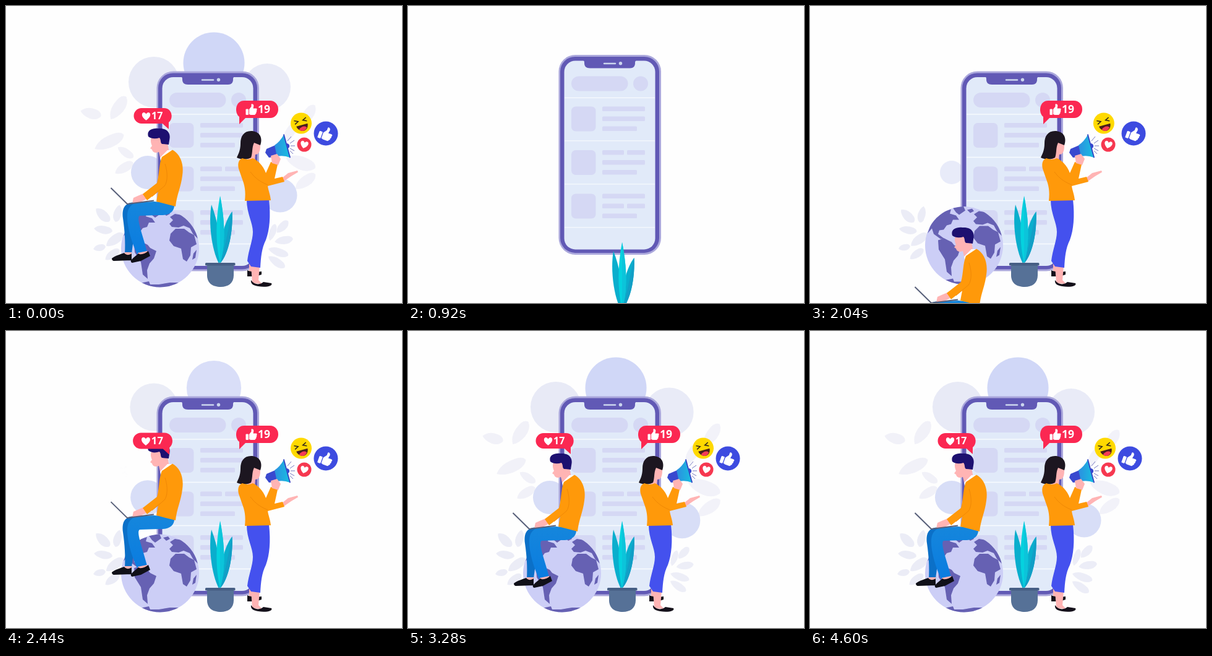
Recreate the animation shown at these times as an HTML page. Size 640x480 px, loop 4640 ms.

```html
<!DOCTYPE html>
<html lang="en">
<head>
<meta charset="utf-8">
<title>Social reactions</title>
<style>
html, body { margin: 0; width: 100%; height: 100%; overflow: hidden; background: #fefefe; }
svg { display: block; width: 100vw; height: 100vh; }
text { font-family: "Open Sans", "Noto Sans", sans-serif; font-weight: 700; fill: #fff; }
</style>
</head>
<body>
<svg viewBox="0 0 640 480" preserveAspectRatio="none">
  <defs>
    <linearGradient id="denim" x1="0" y1="0" x2="0" y2="1">
      <stop offset="0" stop-color="#1586dc"/><stop offset="1" stop-color="#0a7ce0"/>
    </linearGradient>
    <linearGradient id="horn" x1="0" x2="1">
      <stop offset="0" stop-color="#2c8fe0"/><stop offset="1" stop-color="#18bfe0"/>
    </linearGradient>
    <clipPath id="ball"><circle cx="249" cy="391.500" r="63"/></clipPath>
    <path id="heart" d="M0 7C-4 4-7 1-7-2.5C-7-7-2-7.5 0-3.5C2-7.5 7-7 7-2.5C7 1 4 4 0 7Z"/>
    <g id="thumb">
      <rect x="-9" y="-1.5" width="4.5" height="9.5" rx="1"/>
      <path d="M-3.5-1L0-5.5V-9C0-10.5 4-10 3.8-6.5L3-2.5H7.5C9.5-2.5 9.5 0 8.3.6C9.3 1.4 9 3 7.8 3.5C8.5 4.5 8 5.8 6.8 6C7 7.3 6 8 5 8H-1L-3.5 7Z"/>
    </g>
  </defs>

  <g id="leafLowL" fill="#ebecf6"></g>
  <g id="leafTopL" fill="#f1f1f8"></g>
  <g id="leafTopR" fill="#f2f2f9"></g>
  <g id="leafLowR" fill="#ecedf7"></g>
  <circle id="discLeft" cx="229" cy="269" r="27" fill="#d8def7"/>
  <circle id="discPale" cx="239" cy="123" r="41" fill="#e8eaf6"/>
  <circle id="discTop" cx="336" cy="92" r="49.5" fill="#d0d7f7"/>
  <circle id="discRight" cx="422" cy="131" r="38" fill="#e9ebf7"/>
  <circle id="discLow" cx="443" cy="306" r="27.5" fill="#d8def7"/>

  <g id="phone">
    <rect x="243.500" y="105.500" width="165.500" height="323" rx="27" fill="#aba8dc"/>
    <rect x="246" y="108.500" width="160" height="317" rx="24" fill="#6159b5"/>
    <rect x="252.500" y="115" width="147" height="305" rx="18" fill="#e1eaf9"/>
    <path d="M282 114H370C367 115 367 117 367 119C367 124 364 127 359 127H294C288 127 285 124 285 119C285 116 285 115 282 114Z" fill="#6159b5"/>
    <path d="M317 119.500H335" stroke="#cbd6ee" stroke-width="2.500" stroke-linecap="round"/>
    <circle cx="343.500" cy="119.300" r="2.700" fill="#cbd6ee"/>
    <path d="M253 175H399M253 244.500H399M253 314.500H399M253 384.500H399" stroke="#f8fafe" stroke-width="1.300"/>
    <g id="feed" fill="#d5d8f4">
      <rect x="264" y="140" width="91.500" height="24" rx="12"/>
      <circle cx="376" cy="152" r="12"/>
    </g>
  </g>

  <g id="globe">
    <circle cx="249" cy="391.500" r="63" fill="#cccef6"/>
    <g clip-path="url(#ball)" fill="#6661b3">
      <path d="M190 372L198 350L212 338L228 333L226 340L236 343L241 350L231 350L228 357L221 359L216 366L209 367L207 373L215 379L220 382L211 381L200 373L197 364Z"/>
      <path d="M231 331L248 328L251 335L241 342L236 338Z"/>
      <path d="M207 383L217 380L229 386L233 391L243 396L239 408L232 416L228 427L229 441L221 434L218 414L208 398Z"/>
      <path d="M266 368L274 360L288 360L296 366L304 370L308 385L299 390L298 403L292 413L286 409L283 392L271 388L264 379Z"/>
      <path d="M264 352L270 346L265 341L273 336L285 338L297 347L307 360L310 376L302 368L297 359L287 355L279 358L268 357Z"/>
      <path d="M303 400L308 394L306 407L301 410Z"/>
      <path d="M254 334L262 332L265 336L259 339Z"/>
      <path d="M216 448L231 445L233 450L247 450L265 447L283 447L264 458H229Z"/>
    </g>
  </g>

  <g id="plant">
    <path d="M332 321C327 350 332 393 344 416L348 411C348 379 342 347 332 321Z" fill="#0aaecd"/>
    <path d="M365.500 332C352 350 345 381 346 416C360 400 367 365 365.500 332Z" fill="#0aaecd"/>
    <path d="M365.500 332C359 361 354 391 346 416C360 400 367 365 365.500 332Z" fill="#129fc6"/>
    <path d="M346 307C339 342 338 383 346 416C356 382 353 342 346 307Z" fill="#05d2df"/>
    <path d="M346 307V416C356 382 353 342 346 307Z" fill="#0cc4da"/>
    <path d="M325 417H368V435C368 448 359 454 347 454C334 454 325 448 325 435Z" fill="#567197"/>
    <rect x="322" y="415" width="48.500" height="4.500" rx="1.500" fill="#465e84"/>
  </g>

  <g id="man">
    <path d="M208 317C192 318 187 326 189 343C192 364 193 382 192 400H203L211 341Z" fill="#0b70c8"/>
    <path d="M240 316L272 320C273 333 263 339 247 338L216 339C210 342 220 367 228 397L212 401C203 382 195 355 196 338C197 322 207 317 220 317Z" fill="url(#denim)"/>
    <path d="M192 398H203V405H192ZM213 399L228 396L230 403L214 406Z" fill="#ffb4b4"/>
    <path d="M171 408C177 403 186 401 191 399C194 403 199 403 203 400V411L174 412Q171 411 171 408ZM202 411C207 405 211 403 214 400C218 403 225 400 230 396L233 404L218 412L204 415Q201 414 202 411Z" fill="#101018"/>
    <path d="M236 211C232 218 235 223 236 226L233 230L236 232C237 237 242 238 247 236L249 245L264 237L261 221L250 207Z" fill="#ffb4b4"/>
    <path d="M230 211C227 202 235 197 246 198C259 197 266 204 264.500 214L263 224L253 223C249 223 251 216 248 213C242 215 235 215 230 211Z" fill="#1d1070"/>
    <path d="M249 245L261 233L270 233L250 251Z" fill="#fff"/>
    <path d="M206 310L215 306L225 302L231 310L217 317L204 319Z" fill="#ffb4b4"/>
    <path d="M252 244L269 232.500C281 239 288 254 285 274C283 292 276 305 274 324L243 316L246 300L228 314L221 304L244 286C248 272 247 256 252 244Z" fill="#ff990a"/>
    <path d="M257 255C262 270 261 285 256 291L236 308" fill="none" stroke="#f08806" stroke-width="1"/>
    <path d="M169.500 294L196 320L239 314.500" fill="none" stroke="#58607a" stroke-width="2" stroke-linejoin="round"/>
  </g>

  <g id="woman">
    <path d="M393 414H403L402 430H393Z" fill="#ffb4b4"/>
    <path d="M390 427C395 430 406 430 413 429V434L404 437H390Z" fill="#14101a"/>
    <path d="M396 420H410L408 443L414 449L398 448Z" fill="#ffb4b4"/>
    <path d="M396 443C402 452 412 450 416 446L429 448C432 453 419 455 408 453C400 452 395 449 396 443Z" fill="#14101a"/>
    <path d="M389 313H425C428 340 426 362 420 378C413 392 412 406 411 423L396 421L390 412C392 394 399 379 399 365C399 350 389 336 389 313Z" fill="#4451ee"/>
    <path d="M390 238H403L402 251L391 250ZM399 215L410 215C412 226 411 236 407 239C400 242 394 237 395 230Z" fill="#ffb4b4"/>
    <path d="M396 202C384 202 379 211 379 222C379 234 375 240 373 245C381 249 391 248 396 245C399 237 397 229 401 221L411 225C416 211 408 202 396 202Z" fill="#1c1620"/>
    <path d="M446 278L456 270L471 266L472 268.500L461 275L448 284Z" fill="#ffb4b4"/>
    <path d="M382 246C376 248 374 255 376 263L384 286C387 296 387 305 386 315L428 314C427 304 424 298 423 291L450 284L447 276L434 279L439 256L428 252L420 270C416 259 408 250 399 246C393 249 387 248 382 246Z" fill="#ff990a"/>
    <path d="M395 268C402 278 412 285 423 289" fill="none" stroke="#f08806"/>
    <path d="M419 237L421 231L435 225L440 243L425 245Z" fill="#3949cf"/>
    <path d="M434 225Q443 219 449 208L459 245Q449 241 438 243Z" fill="url(#horn)"/>
    <path d="M449 208L459 244.500" stroke="#3445c4" stroke-width="1.800" stroke-linecap="round"/>
    <path d="M453 222C460 222 459 230 455 230Z" fill="#3949cf"/>
    <path d="M455 218L461 211M459 222L466 217M460 226H467M459 230L466 234M459 234L464 239" stroke="#7779c0" stroke-width="1"/>
    <path d="M428 242L438 239L444 247L440 257L430 254Z" fill="#ffb4b4"/>
  </g>

  <g id="love">
    <circle cx="482" cy="224" r="11.500" fill="#f63850"/>
    <use href="#heart" transform="translate(482 224) rotate(14) scale(.9)" fill="#fff"/>
  </g>
  <g id="laugh">
    <circle cx="477" cy="189.500" r="17" fill="#ffd900"/>
    <g transform="translate(477 189.500) rotate(-16)">
      <path d="M-10-7L-4-4L-10-1M10-7L4-4L10-1" fill="none" stroke="#33281c" stroke-width="1.600"/>
      <path d="M-9 3H10C9 16-7 16-9 3Z" fill="#4a201b"/>
      <path d="M-6 9C-2 5 5 5 7 9C3 14-3 14-6 9Z" fill="#f63c55"/>
    </g>
  </g>
  <g id="like">
    <circle cx="517" cy="206" r="19.500" fill="#3d4be0"/>
    <use href="#thumb" transform="translate(516.500 207) rotate(20) scale(1.200)" fill="#fff"/>
  </g>
  <g id="tagLike">
    <path d="M385 153H427A13 14 0 0 1 427 181H387L377 191V179C369 173 370 153 385 153Z" fill="#fb2852"/>
    <use href="#thumb" transform="translate(396.500 168)" fill="#fff"/>
    <text x="407" y="172.500" font-size="17.500">19</text>
  </g>
  <g id="tagLove">
    <path d="M219 165H255C269 165 271 182 263 188V199L253 190H219A12.500 12.500 0 0 1 219 165Z" fill="#fb2852"/>
    <use href="#heart" transform="translate(226.500 178) scale(.95)" fill="#fff"/>
    <text x="235" y="182.500" font-size="16">17</text>
  </g>
</svg>
<script>
const LOOP = 4640, HOLD = 40, DUR = 620;
const $ = id => document.getElementById(id);
const NS = "http://www.w3.org/2000/svg";

function add(parent, tag, attrs) {
  const el = document.createElementNS(NS, tag);
  for (const k in attrs) el.setAttribute(k, attrs[k]);
  parent.append(el);
}

// Feed rows: each line lists [x, width] pieces.
const full = [[314, 69]], split = [[314, 35], [354, 29]], short = [[314, 56]];
[[full, full, short], [split, full, short], [full, split, short]].forEach((lines, row) => {
  const y = 189 + row * 70.5;
  add($("feed"), "rect", { x: 264, y, width: 39.5, height: 40, rx: 7 });
  lines.forEach((pieces, i) => pieces.forEach(([x, width]) =>
    add($("feed"), "rect", { x, y: y + i * 16, width, height: 7.5, rx: 1.5 })));
});

// Leaves: centre, half length, half width, angle.
const leaves = {
  leafLowL: [[156, 338, 15, 7, 45], [180, 335, 14, 6, 105], [157, 362, 15, 6, 10], [176, 378, 17, 7, -35], [172, 402, 14, 6, -35], [151, 391, 10, 5, -10]],
  leafTopL: [[182, 165, 22, 9, -55], [137, 174, 17, 8, 15], [167, 220, 26, 9, -25], [191, 262, 17, 7, -30], [193, 237, 15, 6, 35]],
  leafTopR: [[476, 254, 25, 10, 20], [484, 284, 20, 8, -35], [488, 177, 20, 8, -55], [459, 205, 17, 7, -60]],
  leafLowR: [[447, 357, 13, 6, -45], [431, 366, 14, 5, -70], [449, 379, 15, 6, -8], [440, 398, 17, 6, 20], [437, 414, 16, 6, 35]]
};
for (const id in leaves) leaves[id].forEach(([x, y, a, b, turn]) =>
  add($(id), "path", {
    d: `M${-a} 0Q${-a / 2} ${-b * 1.5} ${a * .6} ${-b}Q${a} ${-b * .7} ${a} 0Q${a * .7} ${b * 1.1} 0 ${b}Q${-a * .7} ${b * .8} ${-a} 0Z`,
    transform: `translate(${x} ${y}) rotate(${turn})`
  }));

// Slides: id, start, dx, dy.
const slides = [
  ["phone", 467, 0, 376], ["plant", 827, 0, 174], ["woman", 1185, 0, 279],
  ["love", 1233, 172, 0], ["laugh", 1476, 182, 0], ["like", 1832, 145, 0],
  ["globe", 1512, 0, 153], ["man", 1973, 0, 284]
];
// Pops: id, start, pivot x, pivot y.
const pops = [
  ["tagLike", 1388, 408, 169], ["leafLowL", 1830, 190, 378], ["discLeft", 1916, 229, 269],
  ["tagLove", 2180, 238, 178], ["discPale", 2240, 239, 123], ["discTop", 2260, 336, 92],
  ["leafTopL", 2420, 195, 230], ["discRight", 2775, 422, 131], ["leafTopR", 2900, 455, 260],
  ["discLow", 3000, 443, 306], ["leafLowR", 3080, 425, 390]
];

const clamp = v => Math.max(0, Math.min(1, v));
const back = p => {
  const u = p - 1;
  return 1 + u * u * (2.70158 * u + 1.70158);
};

function draw(time) {
  const t = time % LOOP;
  const phase = start => t < HOLD ? 1 : clamp((t - start) / DUR);
  for (const [id, start, dx, dy] of slides) {
    const p = phase(start), rest = 1 - back(p);
    $(id).setAttribute("transform", `translate(${dx * rest} ${dy * rest})`);
    $(id).setAttribute("visibility", p > 0 ? "visible" : "hidden");
  }
  for (const [id, start, x, y] of pops) {
    const p = phase(start), s = Math.max(0, back(p));
    $(id).setAttribute("transform", `translate(${x} ${y}) scale(${s}) translate(${-x} ${-y})`);
    $(id).setAttribute("opacity", id.startsWith("tag") ? 1 : clamp(p * 2.8));
    $(id).setAttribute("visibility", p > 0 ? "visible" : "hidden");
  }
}

let origin;
function tick(now) {
  origin ??= now;
  draw(now - origin);
  requestAnimationFrame(tick);
}
draw(0);
requestAnimationFrame(tick);
</script>
</body>
</html>
```
